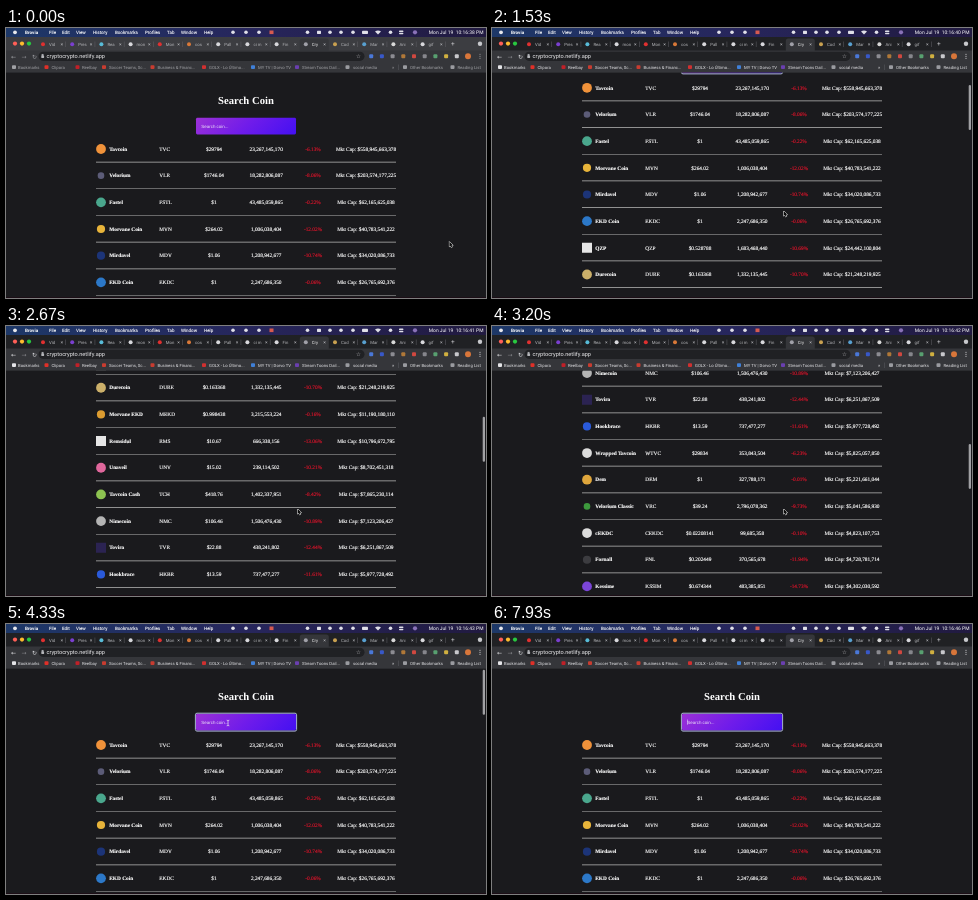
These frames come from a looping animation (480x270 px, 8000 ms). An HTML page with a canvas:

```html
<!DOCTYPE html>
<html lang="en">
<head>
<meta charset="utf-8">
<title>Search Coin</title>
<style>
  html, body { margin: 0; width: 100%; height: 100%; overflow: hidden; background: #1a1a1d; }
  canvas { display: block; width: 480px; height: 270px; }
</style>
</head>
<body>
<canvas id="stage" width="480" height="270"></canvas>
<script>
const ctx = document.getElementById('stage').getContext('2d');
const LOOP = 8000;
const CLICK = 480;
const SANS = 'Roboto, "Liberation Sans", sans-serif';
const INPUT_FONT = '"Liberation Sans", Arial, sans-serif';
const SERIF = '"Liberation Serif", "Times New Roman", serif';
const SYMBOLS = '"DejaVu Sans", sans-serif';

// name | symbol | price | volume | change | market cap | icon colour | icon shape
const coins = `Tavcoin|TVC|29794|23,267,145,170|6.13|558,945,663,378|#f0923a|o
Velorium|VLR|1746.04|18,282,806,087|8.06|203,574,177,225|#5c5c78|s
Fastel|FSTL|1|43,485,059,865|0.22|62,165,625,038|#4aa78d|o
Morvane Coin|MVN|264.02|1,006,038,404|12.02|40,783,541,222|#e8b43a|m
Mirdavel|MDV|1.06|1,208,942,677|10.74|34,020,086,733|#1c3478|m
EKD Coin|EKDC|1|2,247,686,350|0.06|26,765,692,376|#2c78c8|o
QZP|QZP|0.528788|1,683,468,440|10.69|24,442,100,804|#e6e6e6|q
Durecoin|DURE|0.163368|1,332,135,445|10.70|21,248,219,925|#ccb06a|o
Morvane EKD|MEKD|0.998438|3,215,553,224|0.16|11,190,180,110|#dc9c30|m
Remsidul|RMS|10.67|666,338,156|13.06|10,796,672,795|#e6e6e6|q
Unaveil|UNV|15.02|239,114,502|10.21|8,702,451,318|#e0679c|o
Tavcoin Cash|TCH|418.76|1,402,337,951|8.42|7,865,230,114|#8dc351|o
Nimecoin|NMC|106.46|1,506,476,430|10.89|7,123,206,427|#b4b4b4|o
Tovira|TVR|22.88|438,241,802|12.44|6,251,867,509|#2b2352|q
Hookbrace|HKBR|13.59|737,477,277|11.61|5,977,728,492|#2a5ada|m
Wrapped Tavcoin|WTVC|29834|353,843,504|6.23|5,825,057,850|#dcdcdc|o
Dem|DEM|1|327,788,171|0.01|5,221,661,044|#dfa63c|o
Velorium Classic|VRC|39.24|2,796,078,362|9.73|5,041,586,930|#3d9a3d|s
cEKDC|CEKDC|0.02208141|99,685,358|0.10|4,823,107,753|#dcdcdc|o
Fornall|FNL|0.202449|370,565,678|11.94|4,728,781,714|#3c3c40|m
Kessime|KSSIM|0.674344|483,385,851|14.73|4,302,030,592|#7b45d8|o`
  .split('\n').map(line => line.split('|'));

const clamp = p => Math.min(1, Math.max(0, p));
const smooth = p => p * p * (3 - 2 * p);
const swipe = p => 1 - (1 - p ** 1.5) ** 3;

// moves: [start, end, ...values]; the value holds between moves
function track(t, initial, moves, ease) {
  let value = initial;
  for (const [start, end, ...to] of moves) {
    const p = ease(clamp((t - start) / (end - start)));
    value = value.map((v, i) => v + (to[i] - v) * p);
  }
  return value;
}
const scrollAt = t => track(t, [0],
  [[1045, 1800, 69], [1900, 2530, 240], [2640, 3200, 394], [3370, 4180, 0]], swipe)[0];
const mouseAt = t => track(t, [443.4, 213.7],
  [[30, 430, 238, 99], [520, 800, 291.7, 183], [4060, 4320, 222, 99]], smooth);

const typing = [[0, ''], [5070, 'd'], [5270, 'du'], [5470, 'dur'], [5730, 'dure'],
  [6600, 'dur'], [7000, 'du'], [7070, 'd'], [7130, '']];
const queryAt = t => typing.filter(([at]) => at <= t).pop()[1];

// thicken adds a hairline of the text colour, in stage pixels
function text(str, x, y, size, color, { font = SANS, align = 'left', weight = 400, thicken = 0 } = {}) {
  ctx.save();
  ctx.translate(x, y);
  ctx.scale(0.25, 0.25);
  ctx.font = `${weight} ${size * 4}px ${font}`;
  ctx.textRendering = 'geometricPrecision';
  ctx.textAlign = align;
  ctx.fillStyle = ctx.strokeStyle = color;
  ctx.fillText(str, 0, 0);
  if (thicken) {
    ctx.lineWidth = thicken * 4;
    ctx.strokeText(str, 0, 0);
  }
  const width = ctx.measureText(str).width / 4;
  ctx.restore();
  return width;
}
function rect(x, y, w, h, color, r = 0) {
  ctx.fillStyle = color;
  ctx.beginPath();
  ctx.roundRect(x, y, w, h, r);
  ctx.fill();
}
function dot(x, y, r, color) {
  ctx.fillStyle = color;
  ctx.beginPath();
  ctx.arc(x, y, r, 0, 7);
  ctx.fill();
}
function gradient(x0, y0, x1, y1, ...colors) {
  const fill = ctx.createLinearGradient(x0, y0, x1, y1);
  colors.forEach((color, i) => fill.addColorStop(i / (colors.length - 1), color));
  return fill;
}

function drawMenuBar(t) {
  rect(0, 0, 480, 9, gradient(0, 0, 480, 0, '#1d3868', '#27265c', '#211a40'));
  dot(9, 4.3, 1.9, '#e8e8ec');
  text('Brovia', 19, 5.9, 4.6, '#fff', { weight: 700 });
  [['File', 43], ['Edit', 56], ['View', 70], ['History', 87], ['Bookmarks', 109],
    ['Profiles', 139], ['Tab', 161], ['Window', 175], ['Help', 198]]
    .forEach(([label, x]) => text(label, x, 5.9, 4.5, '#fff', { thicken: 0.1 }));
  [227, 240, 253, 301.5, 324, 335, 347, 384.5].forEach(x => dot(x, 4.3, 1.8, '#e0e0e8'));
  rect(263.5, 2.5, 4, 3.6, '#d65a50');
  rect(311, 2.7, 4, 3.2, '#e0e0e8', 0.6);
  rect(356, 2.8, 6, 3.2, '#e0e0e8', 0.8);
  ctx.fillStyle = '#e0e0e8';
  ctx.fill(new Path2D('M369 3.6Q372 1.4 375 3.6L372 6.6Z'));
  rect(393, 2.6, 4.4, 1.5, '#e0e0e8', 0.7);
  rect(393, 4.7, 4.4, 1.5, '#e0e0e8', 0.7);
  dot(409, 4.3, 2.1, '#8a72b8');
  const seconds = 38 + Math.floor((t + 900) / 1000);
  text(`Mon Jul 19  10:16:${seconds} PM`, 477.5, 6, 4.95, '#fff', { align: 'right' });
}

function drawTabs(focused) {
  rect(0, 9, 480, 14, focused ? '#202124' : '#3c3d41');
  ['#ff5f57', '#febc2e', '#28c840'].forEach((color, i) => dot(9 + i * 7, 15.6, 2.1, color));
  const titles = ['Vid', 'Pres', 'Rea', 'mon', 'Mon', 'cos', 'Pall', 'ci m', 'Fin', 'Cry', 'Cod', 'Mar', 'Ani', 'gif'];
  const colors = ['#e03030', '#7a3fd0', '#58bcd8', '#d8d8dc', '#e03030', '#d87838', '#d8d8dc',
    '#d8d8dc', '#d8d8dc', '#a0a0a8', '#c8a050', '#58a0d0', '#d8d8d8', '#d8d8dc'];
  titles.forEach((title, i) => {
    const x = 36 + i * 29.2;
    const active = i === 9;
    if (active) rect(x - 5, 10.5, 29, 14, '#35363a', 2.5);
    else if (i !== 8) rect(x + 23.5, 13.5, 0.5, 5.5, '#606166');
    dot(x + 1, 16.2, 2, colors[i]);
    text(title, x + 7, 17.8, 4.3, active ? '#f0f0f0' : '#b4b5b9');
    text('×', x + 18.5, 17.9, 5, '#c4c5c9');
  });
  text('+', 445, 18.2, 6.5, '#d0d0d4');
  dot(474, 15.8, 2.2, '#c8c9cd');
}

function drawToolbar(focused) {
  const bright = focused ? '#e4e4e7' : '#a0a1a5';
  rect(0, 22.5, 480, 22, '#35363a');
  [['←', 5, bright], ['→', 15.5, '#84858a'], ['↻', 26, bright]]
    .forEach(([glyph, x, color]) => text(glyph, x, 30.6, 6, color, { font: SYMBOLS }));
  rect(32.5, 23.7, 326, 9.2, '#202124', 4.6);
  rect(35.3, 27.6, 2.8, 2.4, '#b4b5b9', 0.4);
  ctx.strokeStyle = '#b4b5b9';
  ctx.lineWidth = 0.5;
  ctx.strokeRect(35.9, 26.2, 1.6, 1.6);
  text('cryptocrypto.netlify.app', 40.5, 30.1, 5.6, '#ececee');
  text('☆', 350, 30.3, 5.4, '#d0d0d4', { font: SYMBOLS });
  ['#4a78d8', '#3858c8', '#8c8c92', '#b07838', '#d04840', '#86868c', '#58a070', '#d0b040', '#c8c8cc']
    .forEach((color, i) => rect(363.2 + i * 10.7, 26.2, 4, 4, color, 1));
  dot(462, 28.2, 3, '#d8763a');
  [26.2, 28.2, 30.2].forEach(y => dot(474, y, 0.55, bright));

  // label, text x, icon x, icon colour
  [['Bookmarks', 12, 8, bright], ['Clipora', 45.5, 40.5, '#e03028'], ['Reelbay', 76, 71.5, '#c02028'],
    ['Soccer Teams, Sc...', 103, 98, '#c83c30'], ['Business & Financ...', 151.5, 146.5, '#c83c30'],
    ['GOLX - Lo Último...', 203, 198, '#d03030'], ['MY TV | Dorvo TV', 252, 247, '#3f80d8'],
    ['Stream Toons Dail...', 296, 291, '#6a3fb0'], ['social media', 347, 341.5, '#9a9ba0'],
    ['Other Bookmarks', 404, 399, '#9a9ba0'], ['Reading List', 451.5, 446.5, '#9a9ba0']]
    .forEach(([label, x, iconX, color]) => {
      rect(iconX - 2, 37.2, 4, 3.8, color, 0.9);
      text(label, x, 40.6, 4.25, bright);
    });
  text('»', 386, 40.5, 4.8, bright);
  rect(392.5, 36.5, 0.5, 5.5, '#5c5d62');
}

function drawInput(t, query) {
  const x = 190, y = 89.8, w = 100, h = 16.7;
  const focused = t > CLICK;
  rect(x, y, w, h, gradient(x + 21, y - 21, x + 79, y + 38, '#9c31d6', '#701cea', '#4310f2'), 1.4);
  if (focused) {
    ctx.strokeStyle = '#b9c6ea';
    ctx.lineWidth = 0.9;
    ctx.beginPath();
    ctx.roundRect(x - 0.6, y - 0.6, w + 1.2, h + 1.2, 1.6);
    ctx.stroke();
  }
  const width = text(query || 'Search coin...', x + 5.3, 99.7, 4.44, '#ece6f8', { font: INPUT_FONT });
  if (focused && Math.floor((t + 370) / 500) % 2 === 0) {
    rect(x + 5.2 + (query ? width : 0), 95.5, 0.5, 5.2, '#efeaff');
  }
}

function drawCoin([name, symbol, price, volume, change, cap, color, shape], y) {
  const cell = (str, x, { color = '#fff', align = 'center', weight = 400 } = {}) =>
    text(str, x, y + 1.7, 5.33, color, { font: SERIF, align, weight, thicken: 0.15 });
  if (shape === 'q') rect(90, y - 5, 10, 10, color);
  else dot(95, y, { o: 4.9, m: 4.1, s: 3.3 }[shape], color);
  cell(name, 103.3, { align: 'left', weight: 700 });
  cell(symbol, 153.3, { align: 'left' });
  cell('$' + price, 208);
  cell(volume, 260.2);
  cell(`-${change}%`, 307, { color: '#d4142a' });
  cell('Mkt Cap: $' + cap, 360);
  rect(90, y + 12.8, 300, 0.65, '#b8b8b8');
}

function drawPage(t) {
  const query = queryAt(t);
  const scroll = scrollAt(t);
  ctx.save();
  ctx.beginPath();
  ctx.rect(0, 44.5, 480, 225.5);
  ctx.clip();
  rect(0, 44, 480, 226, '#1a1a1d');
  ctx.translate(0, -scroll);
  text('Search Coin', 240, 76.4, 10.67, '#fff', { font: SERIF, align: 'center', weight: 700 });
  drawInput(t, query);
  coins.filter(([name]) => name.toLowerCase().includes(query))
    .forEach((coin, i) => drawCoin(coin, 121 + i * 26.67));
  ctx.restore();
  if (t >= 1120) {
    ctx.globalAlpha = 1 - clamp((t - 4480) / 200);
    rect(476.7, 45.8 + scroll * 0.183, 2.3, 45, '#a0a0a3', 1.1);
    ctx.globalAlpha = 1;
  }
  rect(0, 269, 480, 1, '#1c0e16');
}

function drawMouse(t) {
  if (t >= 5070) return;
  const [x, y] = mouseAt(t);
  const top = 89.8 - scrollAt(t);
  ctx.save();
  ctx.translate(x, y);
  ctx.lineJoin = 'round';
  if (x > 190 && x < 290 && y > top && y < top + 16.7) {
    ctx.strokeStyle = '#f0f0f0';
    ctx.lineWidth = 0.7;
    ctx.stroke(new Path2D('M-1.3-2.8Q0-2.8 0-2Q0-2.8 1.3-2.8M0-2V2M-1.3 2.8Q0 2.8 0 2Q0 2.8 1.3 2.8'));
  } else {
    const arrow = new Path2D('M0 0V5L1.1 4L1.9 5.8L2.8 5.4L2 3.7H3.6Z');
    ctx.strokeStyle = '#f0f0f0';
    ctx.lineWidth = 1;
    ctx.stroke(arrow);
    ctx.fillStyle = '#0a0a0a';
    ctx.fill(arrow);
  }
  ctx.restore();
}

function draw(now) {
  const t = now % LOOP;
  const focused = t > CLICK;
  drawPage(t);
  drawMenuBar(t);
  drawTabs(focused);
  drawToolbar(focused);
  drawMouse(t);
}

const started = performance.now();
function tick() {
  draw(performance.now() - started);
  requestAnimationFrame(tick);
}
tick();
</script>
</body>
</html>
```
